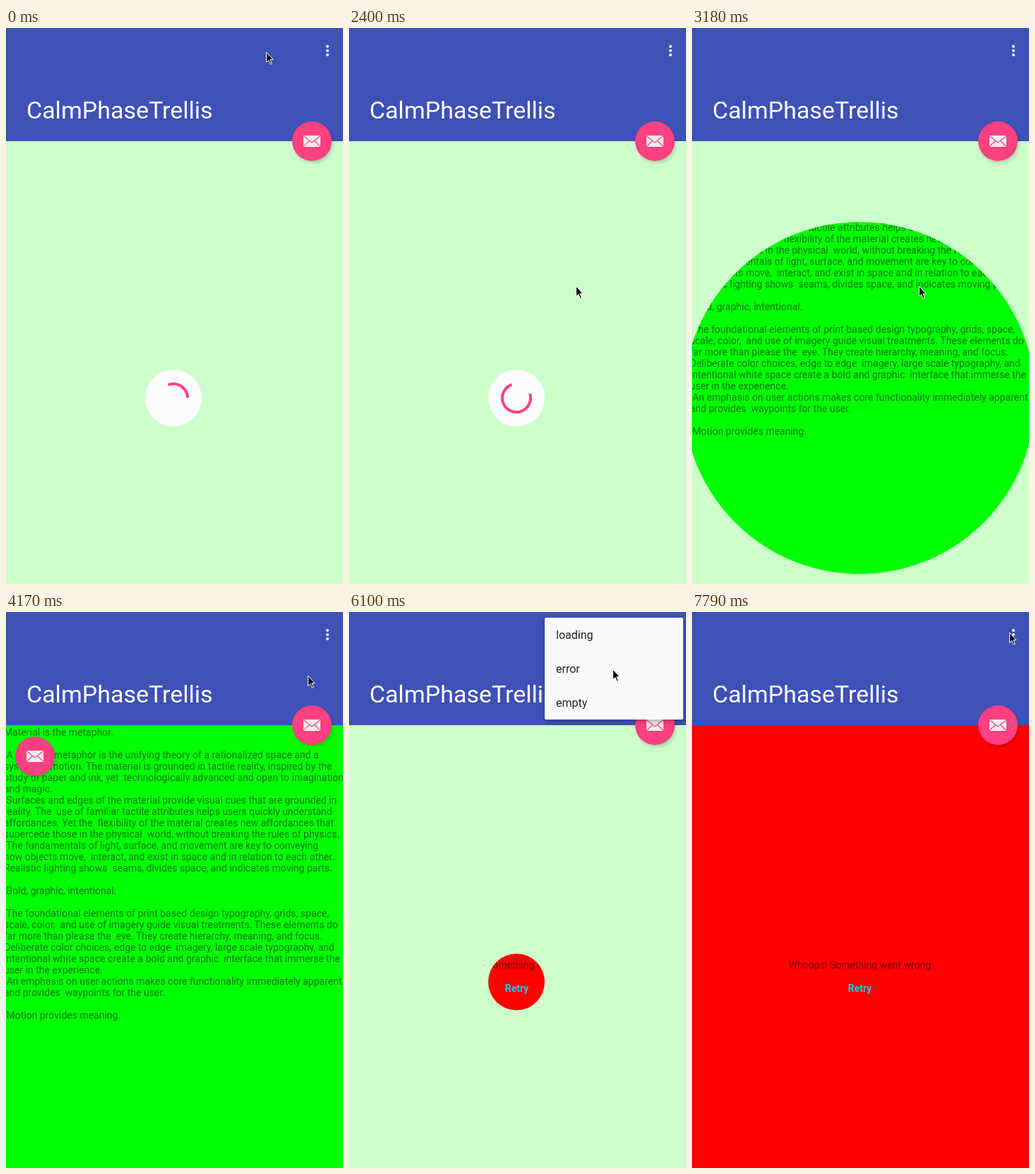
An HTML page for the animation above (8000 ms loop, 477x786 px).

```html
<!DOCTYPE html>
<html lang="en">
<head>
<meta charset="utf-8">
<title>State layout demo</title>
<style>
  html, body { margin: 0; width: 100%; height: 100%; overflow: hidden; }
  body { position: relative; background: #cfc; font: 14px/16px Roboto, sans-serif; }
  body > *, .fab { position: absolute; }
  header { left: 0; top: 0; width: 477px; height: 160px; background: #3f51b5; color: #fff; }
  h1 { position: absolute; left: 29px; top: 96px; margin: 0; font: 400 34px/40px Roboto, sans-serif; white-space: pre; }
  #dots { left: 451px; top: 22px; }
  .page { left: 0; top: 0; width: 477px; height: 786px; color: rgba(0, 0, 0, .54); }
  .page::before { content: ""; position: absolute; inset: 160px 0 0; background: var(--fill); }
  #content { --fill: #0f0; }
  #error { --fill: #f00; text-align: center; }
  #content pre { position: absolute; left: -3px; top: 162px; margin: 0; font: inherit; }
  #error p { position: absolute; left: 0; width: 475px; margin: 0; }
  #error .retry { color: #14cdec; font-weight: 700; }
  .fab { width: 56px; height: 56px; border-radius: 50%; background: #ff4081; box-shadow: 2px 3px 4px rgba(0, 0, 0, .18); }
  .fab svg { position: absolute; left: 16px; top: 20px; }
  #loader { left: 197px; top: 483px; }
  #menu {
    left: 277px; top: 8px; width: 196px; height: 144px; border-radius: 2px; background: #fafafa;
    box-shadow: 0 3px 7px rgba(0, 0, 0, .28); color: rgba(0, 0, 0, .87); font-size: 16px; line-height: 48px;
  }
  #menu div { padding: 0 16px; height: 48px; position: relative; top: 1px; }
  #cursor { left: 0; top: 0; }
</style>
</head>
<body>
<svg id="loader" width="80" height="80" viewBox="-40 -40 80 80">
  <circle r="40" fill="#fcfcfc"/>
  <circle id="arc" r="20" fill="none" stroke="#ff4081" stroke-width="4" pathLength="360"/>
</svg>

<div class="page" id="content">
<pre>Material is the metaphor.

 A material metaphor is the unifying theory of a rationalized space and a
system of motion. The material is grounded in tactile reality, inspired by the
study of paper and ink, yet  technologically advanced and open to imagination
and magic.
 Surfaces and edges of the material provide visual cues that are grounded in
reality. The  use of familiar tactile attributes helps users quickly understand
affordances. Yet the  flexibility of the material creates new affordances that
supercede those in the physical  world, without breaking the rules of physics.
 The fundamentals of light, surface, and movement are key to conveying
how objects move,  interact, and exist in space and in relation to each other.
Realistic lighting shows  seams, divides space, and indicates moving parts.

 Bold, graphic, intentional.

 The foundational elements of print based design typography, grids, space,
scale, color,  and use of imagery guide visual treatments. These elements do
far more than please the  eye. They create hierarchy, meaning, and focus.
Deliberate color choices, edge to edge  imagery, large scale typography, and
intentional white space create a bold and graphic  interface that immerse the
user in the experience.
 An emphasis on user actions makes core functionality immediately apparent
and provides  waypoints for the user.

 Motion provides meaning.</pre>
  <div class="fab" style="left:13px;top:176px"></div>
</div>

<div class="page" id="error">
  <p style="top:491px">Whoops! Something went wrong</p>
  <p class="retry" style="top:524px">Retry</p>
</div>

<header><h1>CalmPhaseTrellis</h1></header>
<svg id="dots" width="8" height="20" fill="#fff">
  <circle cx="4" cy="4" r="2"/><circle cx="4" cy="10" r="2"/><circle cx="4" cy="16" r="2"/>
</svg>
<div class="fab" style="left:405px;top:132px"></div>
<div id="menu"><div>loading</div><div>error</div><div>empty</div></div>
<svg id="cursor" width="12" height="20">
  <path d="M.5 1v14.5l3.3-3 2.5 5.8 2-.9-2.4-5.8H10z" stroke="#fff" stroke-linejoin="round"/>
</svg>

<script>
const LOOP = 8000;
const CONTENT_AT = 3025, ERROR_AT = 6100;
const $ = id => document.getElementById(id);
const [arc, loader, content, error, menu, cursor] =
  ['arc', 'loader', 'content', 'error', 'menu', 'cursor'].map($);

for (const fab of document.querySelectorAll('.fab'))
  fab.innerHTML = `<svg width="24" height="16"><path fill="#eee" d="M0 0h24v16H0z"/>
    <path d="M0 .5 12 10 24 .5M0 15.5 8.5 7.5M24 15.5 15.5 7.5" fill="none" stroke="#ff4081" stroke-width="1.2"/></svg>`;

const clamp = v => Math.min(1, Math.max(0, v));
const ramp = (t, start, duration) => clamp((t - start) / duration);
const smooth = u => u * u * (3 - 2 * u);
const show = (el, on) => { el.style.visibility = on ? 'visible' : 'hidden'; };

// cubic-bezier(.4, 0, .2, 1)
function fastOutSlowIn(x) {
  let lo = 0, hi = 1;
  for (let i = 0; i < 20; i++) {
    const s = (lo + hi) / 2, r = 1 - s;
    if (1.2 * r * r * s + .6 * r * s * s + s ** 3 < x) lo = s; else hi = s;
  }
  return 3 * (1 - lo) * lo * lo + lo ** 3;
}

// The head runs ahead in the first half of a cycle, the tail catches up in the second.
function drawSpinner(t) {
  const period = 1275, turn = 210, span = 288;
  const cycles = (t - 370) / period, n = Math.floor(cycles), p = cycles - n;
  const base = 48 + n * span + turn * cycles;
  const tail = span * fastOutSlowIn(clamp(2 * p - 1));
  const head = span * fastOutSlowIn(clamp(2 * p)) + 12;
  arc.setAttribute('stroke-dasharray', `${head - tail} 360`);
  arc.setAttribute('transform', `rotate(${(base + tail) % 360})`);
}

function reveal(page, t, start) {
  const u = ramp(t, start, 300);
  const r = 40 + 393 * (1 - Math.cos(Math.PI * u)) / 2;
  page.style.clipPath = u < 1 ? `circle(${r}px at 237px 523px)` : 'none';
}

function drawCursor(t) {
  let x = 368, y = 33;
  const move = (start, end, toX, toY) => {
    const u = smooth(ramp(t, start, end - start));
    x += (toX - x) * u;
    y += (toY - y) * u;
  };
  move(500, 1000, 321, 364);
  move(3660, 3810, 293, 383);
  move(3810, 4290, 451, 35);
  move(4400, 4540, 446, 51);
  move(4540, 4810, 409, 78);
  move(5000, 5350, 373, 80);
  move(6250, 6370, 372, 79);
  move(6600, 6770, 367, 85);
  move(6770, 7160, 256, 507);
  move(7160, 7400, 437, 186);
  move(7400, 7790, 449, 28);
  cursor.style.transform = `translate(${Math.round(x)}px, ${Math.round(y)}px)`;
}

function draw(t) {
  show(loader, t < CONTENT_AT);
  show(content, t >= CONTENT_AT && t < ERROR_AT);
  show(error, t >= ERROR_AT);
  drawSpinner(t);
  reveal(content, t, CONTENT_AT);
  reveal(error, t, ERROR_AT + 33);
  menu.style.opacity = ramp(t, 4600, 250) - ramp(t, 6130, 260);
  drawCursor(t);
}

const origin = performance.now();
function loop() {
  draw((performance.now() - origin) % LOOP);
  requestAnimationFrame(loop);
}
loop();
</script>
</body>
</html>
```
